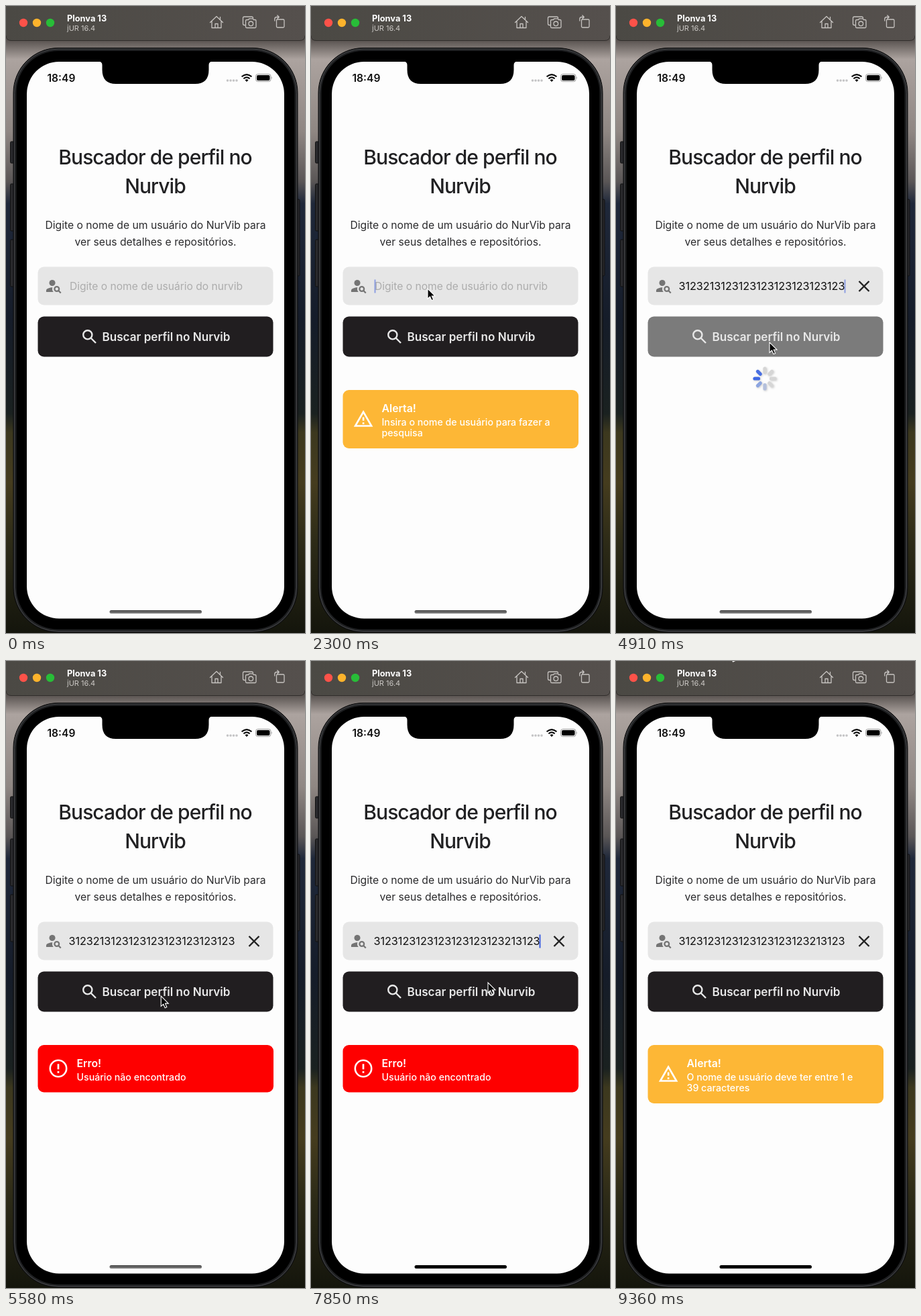
Write an HTML page that moves like this. It is 446 px wide and 934 px high and loops after 9.39 s.

```html
<!DOCTYPE html>
<html lang="pt">
<head>
<meta charset="utf-8">
<title>Buscador de perfil</title>
<style>
  html, body { margin: 0; width: 100%; height: 100%; overflow: hidden; background: #111; }
  svg { display: block; }
  text { font-family: Inter, "Liberation Sans", sans-serif; font-optical-sizing: none; white-space: pre; }
  .mid { text-anchor: middle; }
  .title { font-size: 30px; font-weight: 500; letter-spacing: -.93px; fill: #212123; }
  .body { font-size: 15.7px; fill: #2a2a2c; }
  .head { font-size: 15.8px; font-weight: 600; fill: #fff; }
  .note { font-size: 14.2px; font-weight: 500; fill: #fff; }
  .tool { fill: none; stroke: #c6c3c0; stroke-width: 1.3; stroke-linejoin: round; stroke-linecap: round; }
  #spinner { filter: drop-shadow(1px 1.5px 1.5px #0003); }
</style>
</head>
<body>
<svg width="446" height="934" viewBox="0 0 446 934">
  <defs>
    <linearGradient id="wall" x2="0" y2="1">
      <stop offset=".055" stop-color="#5a5451"/>
      <stop offset=".085" stop-color="#aca39f"/>
      <stop offset=".2" stop-color="#8f8783"/>
      <stop offset=".28" stop-color="#5a5656"/>
      <stop offset=".315" stop-color="#1f283a"/>
      <stop offset=".5" stop-color="#151c29"/>
      <stop offset=".65" stop-color="#1a2120"/>
      <stop offset=".68" stop-color="#3c381e"/>
      <stop offset=".76" stop-color="#453c1e"/>
      <stop offset=".86" stop-color="#2c2a17"/>
      <stop offset="1" stop-color="#14150c"/>
    </linearGradient>
    <linearGradient id="bar">
      <stop offset="0" stop-color="#4b4944"/>
      <stop offset="1" stop-color="#55504d"/>
    </linearGradient>
    <linearGradient id="grey" x2="0" y2="1">
      <stop offset="0" stop-color="#464646"/>
      <stop offset="1" stop-color="#858585"/>
    </linearGradient>
  </defs>

  <rect width="446" height="934" fill="url(#wall)"/>

  <!-- Phone -->
  <g fill="#29292c" stroke="#111">
    <rect x="6.5" y="202" width="6" height="32" rx="1.5"/>
    <rect x="6.5" y="265" width="6" height="70" rx="1.5"/>
    <rect x="6.5" y="348" width="6" height="70" rx="1.5"/>
    <rect x="433" y="288" width="5" height="114" rx="1.5"/>
  </g>
  <rect x="11" y="62.5" width="424" height="870.5" rx="67" fill="#1f2022" stroke="#0b0b0c"/>
  <rect x="12.5" y="64" width="421" height="867.5" rx="65.5" fill="none" stroke="#47484a"/>
  <rect x="15.5" y="67" width="415" height="861.5" rx="62" fill="#000"/>
  <rect x="31" y="83" width="384" height="829.5" rx="48" fill="#fdfdfd"/>
  <path d="M138.5 82.5Q143.500 83 143.500 88V95Q143.500 116 164 116H282Q302.500 116 302.500 95V88Q302.500 83 307.500 82.500Z"/>

  <!-- Window bar -->
  <path d="M0 0H446V44Q446 52 438 52H8Q0 52 0 44Z" fill="url(#bar)"/>
  <path d="M0 44Q0 51.5 8 51.5H438Q446 51.5 446 44" fill="none" stroke="#302d2b"/>
  <circle cx="26" cy="25" r="6.2" fill="#fd5249"/>
  <circle cx="46" cy="25" r="6.2" fill="#fcb32c"/>
  <circle cx="66" cy="25" r="6.2" fill="#28bd38"/>
  <text x="91" y="23" font-size="12.8" font-weight="700" fill="#fff">Plonva 13</text>
  <text x="91" y="37" font-size="11" fill="#cbc8c5">jUR 16.4</text>
  <g class="tool">
    <path d="M304.5 24.5L314 15.5L323.5 24.5M307 22.5V32.5H321V22.5M319.5 20V16.5M312 32V26.5H316V32"/>
    <path d="M356.5 28.5H355.5Q353.5 28.5 353.5 26.5V18Q353.5 16 355.5 16H366.5Q368.5 16 368.5 18"/>
    <path d="M359.5 20.5H361.5L363 18.8H368L369.5 20.5H371.5Q373 20.5 373 22V31Q373 32.5 371.5 32.5H359Q357.5 32.5 357.5 31V22Q357.5 20.5 359.5 20.5Z"/>
    <circle cx="365.3" cy="26.3" r="3.3"/>
    <rect x="403.5" y="20" width="11.5" height="12" rx="1.5"/>
    <path d="M400.8 22V19.500Q400.800 16.500 403.800 16.500H407M404.800 14L407.300 16.500L404.800 19"/>
  </g>

  <!-- Status bar -->
  <text x="61.5" y="113" font-size="15.6" font-weight="600" fill="#111">18:49</text>
  <g fill="#c4c4c6">
    <circle cx="330.5" cy="111" r="1.8"/><circle cx="335" cy="111" r="1.8"/>
    <circle cx="339.5" cy="111" r="1.8"/><circle cx="344" cy="111" r="1.8"/>
  </g>
  <path d="M359 113L356.5 110.3Q359 108.3 361.5 110.3Z"/>
  <path d="M354.4 108.2Q359 104.3 363.6 108.2M351.6 105.3Q359 98.8 366.4 105.3" fill="none" stroke="#000" stroke-width="2.1"/>
  <rect x="372.5" y="101.5" width="22.5" height="11" rx="3.2" fill="none" stroke="#999"/>
  <rect x="374" y="103" width="19.5" height="8" rx="2"/>
  <path d="M396.2 105.2Q398 107 396.2 108.8Z" fill="#999"/>

  <!-- Page -->
  <text class="title mid" x="222.5" y="236">Buscador de perfil no</text>
  <text class="title mid" x="222.5" y="279">Nurvib</text>
  <text class="body mid" x="223" y="332">Digite o nome de um usuário do NurVib para</text>
  <text class="body mid" x="223" y="357">ver seus detalhes e repositórios.</text>

  <rect x="47.5" y="388.5" width="351" height="57" rx="9" fill="#e6e6e6"/>
  <g transform="translate(57.7 403.4) scale(1.13)" fill="#747474">
    <circle cx="10" cy="8" r="4"/>
    <path d="M10.35 14C7.62 13.91 2 15.27 2 18v2h9.54c-2.47-2.76-1.23-5.89-1.19-6z"/>
    <circle cx="16" cy="16" r="3" fill="none" stroke="#747474" stroke-width="2"/>
    <path d="M18 18L21.3 21.3" stroke="#747474" stroke-width="2"/>
  </g>
  <text id="hint" x="95" y="423" font-size="15.6" fill="#acacac">Digite o nome de usuário do nurvib</text>
  <svg x="94" y="400" width="250" height="34">
    <text id="typed" y="23" font-size="16.2" fill="#111"/>
    <rect id="caret" y="7.5" width="2" height="20" fill="#3d5fe0"/>
  </svg>
  <path id="clear" d="M362.5 410L377.5 425M377.5 410L362.5 425" stroke="#222" stroke-width="2.4"/>

  <rect id="button" x="47.5" y="462.5" width="351" height="60" rx="9"/>
  <g fill="none" stroke="#e8e8e8" stroke-width="2.4">
    <circle cx="121.8" cy="489.8" r="6.6"/>
    <path d="M126.5 494.5L134 502"/>
  </g>
  <text x="143.5" y="498.5" font-size="17.1" font-weight="600" fill="#e8e8e8">Buscar perfil no Nurvib</text>

  <g id="spinner" transform="translate(222 555)" stroke-width="5.2" stroke-linecap="round"/>

  <g id="alert">
    <rect x="47.5" y="572" width="351.5" height="87" rx="9" fill="#fdb736"/>
    <path transform="translate(62.5 599.5) scale(1.3)" fill="#fff" d="M12 6L19.53 19H4.47L12 6M12 2L1 21h22L12 2zm1 14h-2v2h2v-2zm0-6h-2v4h2v-4z"/>
    <text class="head" x="105.5" y="605">Alerta!</text>
    <text class="note" id="line1" x="105.5" y="625"/>
    <text class="note" id="line2" x="105.5" y="641"/>
  </g>
  <g id="error">
    <rect x="47.5" y="572" width="351.5" height="70.500" rx="9" fill="#fe0000"/>
    <circle cx="78" cy="607" r="12.2" fill="none" stroke="#fff" stroke-width="2.6"/>
    <path d="M78 600.2V608.3M78 611V613.7" stroke="#fff" stroke-width="2.7"/>
    <text class="head" x="105.5" y="605">Erro!</text>
    <text class="note" x="105.5" y="625">Usuário não encontrado</text>
  </g>

  <rect id="home" x="154.5" y="900" width="137.5" height="5" rx="2.5"/>
  <path id="cursor" d="M0 0V15.2L3.5 12L6 17.5L8.6 16.4L6.2 11H11Z" fill="#000" stroke="#fff" stroke-width="1.1"/>
</svg>

<script>
const LOOP = 9390;
const $ = id => document.getElementById(id);
const [hint, typed, caret, clear, button, spinner, alertBox, errorBox, line1, line2, home, cursor] =
  ['hint', 'typed', 'caret', 'clear', 'button', 'spinner', 'alert', 'error', 'line1', 'line2', 'home', 'cursor'].map($);

const digits = '1312312312321312312312' + '3123123123123' + '123123213123';
const notes = {
  empty: ['Insira o nome de usuário para fazer a', 'pesquisa'],
  length: ['O nome de usuário deve ter entre 1 e', '39 caracteres']
};

// time, x, y of the pointer tip
const path = [
  [600, 450, 570], [1050, 225, 500], [1550, 225, 500], [2150, 174, 421],
  [2600, 174, 421], [3100, 183, 433], [4250, 183, 433], [4700, 229, 501],
  [5500, 229, 501], [6350, 317, 429], [7450, 317, 429], [7800, 264, 479],
  [8400, 264, 479], [9360, 168.5, -16.5]
];

const clamp = (v, lo = 0, hi = 1) => Math.min(hi, Math.max(lo, v));
const within = (t, a, b) => t >= a && t < b;
const show = (el, on) => el.setAttribute('visibility', on ? 'visible' : 'hidden');

for (let i = 0; i < 8; i++) {
  const spoke = document.createElementNS(spinner.namespaceURI, 'path');
  spoke.setAttribute('d', 'M0 -9.5V-15');
  spoke.setAttribute('transform', `rotate(${i * 45})`);
  spinner.append(spoke);
}

function pointer(t) {
  const i = path.findIndex(p => p[0] >= t);
  if (i < 0) return path.at(-1).slice(1);
  if (i === 0) return path[0].slice(1);
  const [a, b] = [path[i - 1], path[i]];
  const u = (t - a[0]) / (b[0] - a[0]);
  const e = u * u * (3 - 2 * u);
  return [1, 2].map(k => a[k] + (b[k] - a[k]) * e);
}

function typedCount(t) {
  return clamp(Math.floor((t - 2650) / 43), 0, 35) + clamp(Math.floor((t - 6900) / 55), 0, 12);
}

function caretOpacity(t) {
  if (t < 2230) return 0;
  if (within(t, 2650, 4160) || within(t, 6900, 7700)) return 1;
  const start = t < 2650 ? 2550 : t < 6500 ? 4160 : t < 6900 ? 6600 : 7700;
  return clamp(.5 + 2.2 * Math.cos((t - start) / 1000 * 2 * Math.PI));
}

function drawField(t) {
  const n = typedCount(t);
  typed.textContent = digits.slice(0, n);
  const width = n ? typed.getComputedTextLength() : 0;
  const x = Math.min(1, 247.5 - width);
  typed.setAttribute('x', x);
  caret.setAttribute('x', clamp(x + width - .5, .5, 246.5));
  caret.setAttribute('opacity', caretOpacity(t));
  show(hint, n === 0);
  show(clear, n > 0);
}

function drawSpinner(t) {
  const on = within(t, 4780, 5420);
  show(spinner, on);
  if (!on) return;
  const head = 7 + Math.floor((t - 4850) / 100);
  [...spinner.children].forEach((spoke, i) => {
    const age = ((head - i) % 8 + 8) % 8;
    spoke.setAttribute('stroke', ['#4a70e2', '#3f68e4', '#8da5e0', '#b4c0dc'][age] || '#d6d6d6');
  });
}

function draw(t) {
  drawField(t);
  drawSpinner(t);

  const pressed = [[1150, 1330], [4740, 4980], [8020, 8200]].some(([a, b]) => within(t, a, b));
  button.setAttribute('fill', pressed ? '#7b7b7b' : '#211e20');

  const note = t < 5000 ? notes.empty : notes.length;
  line1.textContent = note[0];
  line2.textContent = note[1];
  show(alertBox, within(t, 1260, 4780) || t >= 8130);
  show(errorBox, within(t, 5420, 8130));

  home.setAttribute('fill', t < 7200 ? 'url(#grey)' : '#000');
  const [x, y] = pointer(t);
  cursor.setAttribute('transform', `translate(${x} ${y})`);
  show(cursor, t >= 600);
}

const begin = performance.now();
function frame() {
  draw((performance.now() - begin) % LOOP);
  requestAnimationFrame(frame);
}
draw(0);
requestAnimationFrame(frame);
</script>
</body>
</html>
```
